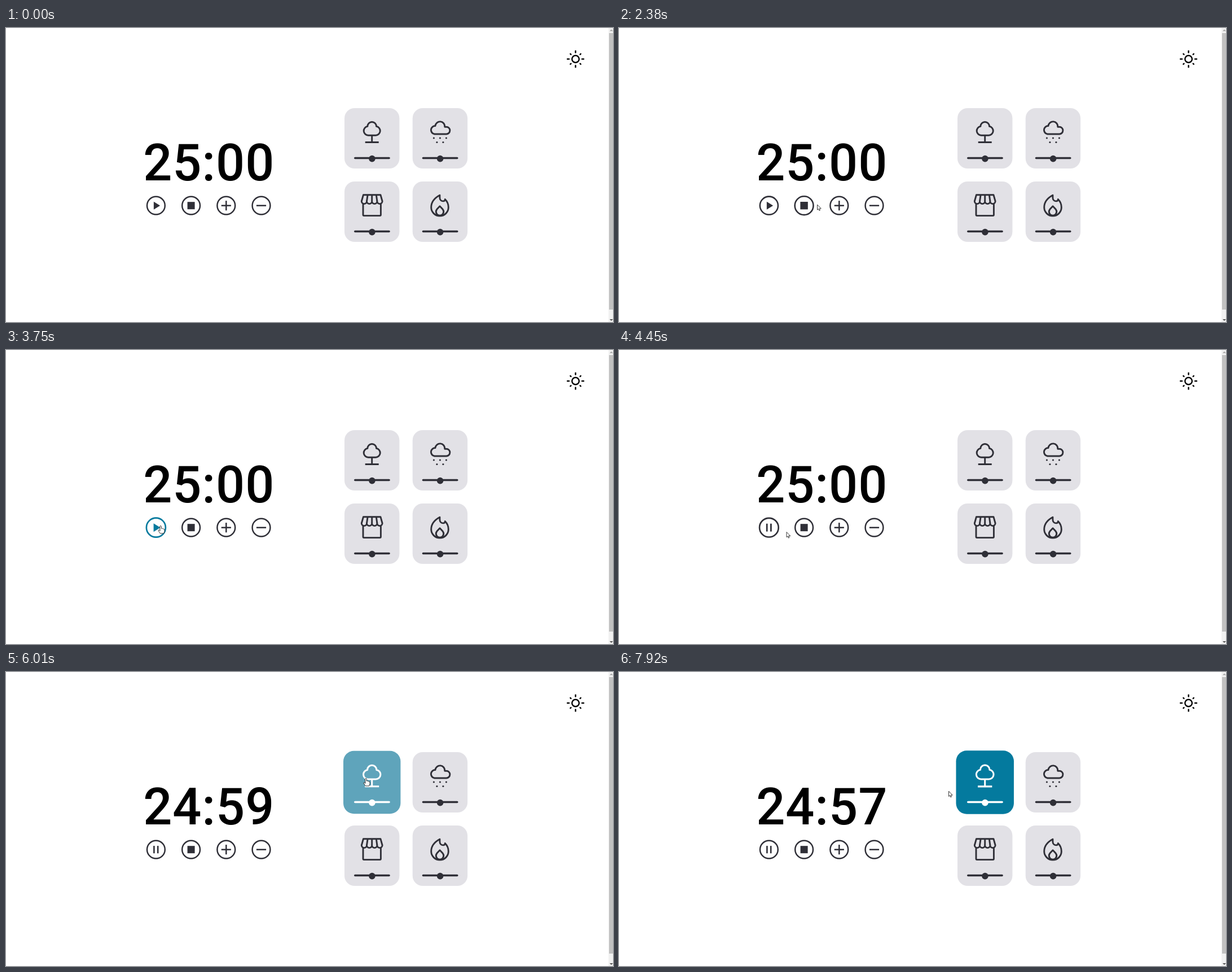
Animation of 1076x521 px, one loop 7.99 s. Source, as an HTML page with a canvas:

```html
<!DOCTYPE html>
<html lang="en">
<head>
<meta charset="utf-8">
<title>Focus timer</title>
<style>
  html, body { margin: 0; width: 100%; height: 100%; overflow: hidden; background: #fff; }
  canvas { display: block; }
</style>
</head>
<body>
<canvas id="stage" width="1076" height="521"></canvas>
<script>
const ctx = document.getElementById('stage').getContext('2d');
const LOOP = 7990, SHOW = 460, CLICK = 4110, FIRST_TICK = 5110, TICK = 1030;
const INK = '#2f2f37', BLUE = '#047a9e', GROW = 0.07;

// Where the pointer turns or rests: time, x, y
const PATH = [
  [SHOW, 925, 498], [1210, 481, 381], [1830, 266, 329], [2110, 269, 315],
  [2750, 477, 312], [2990, 434, 313], [3600, 274, 311], [4330, 274, 311],
  [4560, 316, 332.5], [5340, 316, 332.5], [5480, 326, 350], [5840, 600, 222],
  [6010, 638, 188], [6360, 638, 163.5], [6570, 638, 163.5], [6640, 645, 163.5],
  [7540, 645, 163.5], [LOOP, 580, 214.5]
];

const BUTTONS = [0, 1, 2, 3].map(i => ({ x: 265.9 + 62.2 * i, y: 314.7, hw: 19, hh: 17, dur: 300 }));
const CARDS = [0, 1, 2, 3].map(i => ({
  x: 648.7 + 120.7 * (i % 2), y: 195.5 + 130 * (i >> 1), hw: 49, hh: 54, dur: 500
}));

const TREE = new Path2D('M-6.3-5.3H6.3A8 8 0 0 0 7.8-21.2A7.8 7.8 0 0 0-7.8-21.2A8 8 0 0 0-6.3-5.3ZM0-5.3V7M-12 7H12');
const CLOUD = new Path2D('M-9.9-7.5H11.1A6.4 6.4 0 0 0 11.1-20.3H8.4A8.4 8.4 0 0 0-8.5-22A7.3 7.3 0 0 0-9.9-7.5Z');
const FIRE = new Path2D('M-.5-29.2V-25C-.5-21 2.4-18.6 5.6-18.6Q8.8-18.6 8.9-22C13-18 14.9-13 14.9-7.7A15.3 15.3 0 0 1-15.7-7.7C-15.7-16-10-24-.5-29.2ZM-.4-9.8L-5.6-4.2A6.8 6.8 0 0 0-.4 6.8A6.8 6.8 0 0 0 4.8-4.2Z');
const ARROW = new Path2D('M.4 .4V9.2L2.4 7.4L3.8 10.6L5.3 9.9L4 6.9H6.7Z');
const HAND = new Path2D('M-1.2 1.2Q0-.6 1.2 1.2V5.2Q2.6 4.4 3.4 5.6Q4.8 5 5.4 6.4Q7 6 7 8V10.5L5.6 14H-.8L-4 9.2Q-4 7.4-2.6 8L-1.2 9.2Z');

// Monotone cubic through the path points, so rests stay still
function slope(i, a) {
  if (i === 0 || i === PATH.length - 1) return 0;
  const rate = j => (PATH[j + 1][a] - PATH[j][a]) / (PATH[j + 1][0] - PATH[j][0]);
  const p = rate(i - 1), q = rate(i);
  return p * q <= 0 ? 0 : 2 * p * q / (p + q);
}
function pointer(t) {
  let i = 0;
  while (i < PATH.length - 2 && PATH[i + 1][0] <= t) i++;
  const p = PATH[i], q = PATH[i + 1], h = q[0] - p[0], u = (t - p[0]) / h, v = 1 - u;
  return [1, 2].map(a =>
    p[a] * v * v * (1 + 2 * u) + q[a] * u * u * (3 - 2 * u) +
    h * u * v * (slope(i, a) * v - slope(i + 1, a) * u));
}

// CSS "ease" timing curve
function ease(x) {
  if (x <= 0) return 0;
  if (x >= 1) return 1;
  let lo = 0, hi = 1, s = 0.5;
  for (let i = 0; i < 20; i++) {
    s = (lo + hi) / 2;
    if (0.75 * (1 - s) * s + s ** 3 < x) lo = s; else hi = s;
  }
  return 0.3 * (1 - s) ** 2 * s + 3 * (1 - s) * s * s + s ** 3;
}

const inside = (b, [x, y], w = b.hw, h = b.hh) => Math.abs(x - b.x) < w && Math.abs(y - b.y) < h;

// Times at which the pointer enters and leaves each target, in turn
for (const b of [...BUTTONS, ...CARDS]) {
  b.flips = [];
  for (let t = SHOW; t < LOOP; t += 5)
    if (inside(b, pointer(t)) !== (b.flips.length % 2 === 1)) b.flips.push(t);
}
const hovered = (b, t) => b.flips.filter(f => f <= t).length % 2 === 1;
function level(b, t) {
  let v = 0;
  b.flips.forEach((f, i) => {
    if (f > t) return;
    const end = Math.min(t, b.flips[i + 1] ?? t), goal = i % 2 ? 0 : 1;
    v += (goal - v) * ease((end - f) / b.dur);
  });
  return v;
}

function paint(color) { ctx.fillStyle = ctx.strokeStyle = color; }
function line(x1, y1, x2, y2) {
  ctx.beginPath();
  ctx.moveTo(x1, y1);
  ctx.lineTo(x2, y2);
  ctx.stroke();
}
function circle(x, y, r) {
  ctx.beginPath();
  ctx.arc(x, y, r, 0, 7);
}
function disc(x, y, r) {
  circle(x, y, r);
  ctx.fill();
}
// Triangle with a base of 2 * half, pointing along (dx, dy)
function triangle(x, y, half, dx, dy) {
  const len = Math.hypot(dx, dy), nx = -dy / len * half, ny = dx / len * half;
  ctx.beginPath();
  ctx.moveTo(x + nx, y + ny);
  ctx.lineTo(x - nx, y - ny);
  ctx.lineTo(x + dx, y + dy);
  ctx.fill();
}
function scaled(b, t, draw) {
  const s = 1 + GROW * level(b, t);
  ctx.save();
  ctx.translate(b.x, b.y);
  ctx.scale(s, s);
  draw();
  ctx.restore();
}

const minus = () => line(-8.6, 0, 8.6, 0);
const GLYPHS = [
  t => {
    if (t < CLICK) return triangle(-4, 0, 7, 11.2, 0);
    for (const x of [-3.5, 3.3]) ctx.fillRect(x - 1.3, -6.6, 2.6, 13.2);
  },
  () => ctx.fillRect(-6.5, -6.5, 13, 13),
  () => { minus(); line(0, -8.6, 0, 8.6); },
  minus
];

function drawButton(b, i, t) {
  scaled(b, t, () => {
    paint(hovered(b, t) ? BLUE : INK);
    ctx.lineWidth = 2.5;
    ctx.lineCap = 'butt';
    circle(0, 0, 15.9);
    ctx.stroke();
    GLYPHS[i](t);
  });
}

function drawShop() {
  const top = -29.7, eave = -18.5, r = 4.6, side = 15.7, floor = 7.1;
  ctx.beginPath();
  ctx.moveTo(15.3, top);
  ctx.lineTo(-15.3, top);
  for (let i = 0; i < 4; i++) ctx.arc((2 * i - 3) * r, eave, r, Math.PI, 0, true);
  ctx.closePath();
  ctx.moveTo(-side, eave + r);
  ctx.arcTo(-side, floor, side, floor, 1.6);
  ctx.arcTo(side, floor, side, eave, 1.6);
  ctx.lineTo(side, eave + r);
  ctx.stroke();
  for (const i of [-1, 0, 1]) line(7.6 * i, top, 2 * r * i, eave);
}

const ICONS = [
  () => ctx.stroke(TREE),
  () => {
    ctx.stroke(CLOUD);
    for (let i = -2; i <= 2; i++) disc(5.5 * i, i % 2 ? 7 : -0.5, 1.6);
  },
  drawShop,
  () => ctx.stroke(FIRE)
];

function drawCard(b, i, t) {
  const start = b.flips[0] ?? Infinity, on = t >= start;
  const k = on ? ease((t - start) / b.dur) : 0;
  const mix = (p, q) => Math.round(p + (q - p) * k);
  const ink = on ? '#fff' : INK;
  scaled(b, t, () => {
    ctx.fillStyle = `rgb(${mix(226, 4)},${mix(225, 122)},${mix(230, 158)})`;
    ctx.beginPath();
    ctx.roundRect(-48.7, -53.5, 97.4, 107, 18);
    ctx.fill();
    paint(ink);
    ctx.lineWidth = 2.9;
    ctx.lineCap = 'butt';
    ICONS[i]();
  });
  paint(ink);
  ctx.lineCap = 'round';
  ctx.lineWidth = 3.4;
  line(b.x - 30, b.y + 35, b.x + 30.4, b.y + 35);
  disc(b.x + 0.2, b.y + 36.1, 5.8);
}

function drawSun() {
  ctx.save();
  ctx.translate(1009.6, 55);
  paint('#000');
  ctx.lineCap = 'round';
  ctx.lineWidth = 2.4;
  circle(0, 0, 6.3);
  ctx.stroke();
  for (let i = 0; i < 8; i++) {
    line(11.5, 0, i % 2 ? 13 : 14.4, 0);
    ctx.rotate(Math.PI / 4);
  }
  ctx.restore();
}

function drawScrollbar() {
  ctx.fillStyle = '#f1f1f1';
  ctx.fillRect(1068, 0, 8, 521);
  ctx.fillStyle = '#c1c1c1';
  ctx.fillRect(1069, 9, 7, 490);
  ctx.fillStyle = '#a3a3a3';
  triangle(1073, 5.5, 3, 0, -3);
  ctx.fillStyle = '#505050';
  triangle(1073, 516, 3, 0, 3);
}

function drawPointer(t) {
  const p = pointer(t);
  const hand = BUTTONS.some(b => inside(b, p, 18, 19)) || CARDS.some(b => inside(b, p));
  const shape = hand ? HAND : ARROW;
  ctx.save();
  ctx.translate(...p);
  ctx.fillStyle = '#fff';
  ctx.strokeStyle = '#222';
  ctx.lineWidth = 0.9;
  ctx.fill(shape);
  ctx.stroke(shape);
  ctx.restore();
}

function drawTime(t) {
  const left = 1500 - Math.max(0, Math.floor((t - FIRST_TICK) / TICK) + 1);
  const text = Math.floor(left / 60) + ':' + String(left % 60).padStart(2, '0');
  ctx.fillStyle = '#000';
  ctx.font = '500 90px Roboto, sans-serif';
  ctx.letterSpacing = '0.9px';
  ctx.textAlign = 'center';
  ctx.fillText(text, 359.7, 270);
}

function frame(t) {
  ctx.fillStyle = '#fff';
  ctx.fillRect(0, 0, 1076, 521);
  ctx.lineJoin = 'round';
  drawTime(t);
  BUTTONS.forEach((b, i) => drawButton(b, i, t));
  CARDS.forEach((b, i) => drawCard(b, i, t));
  drawSun();
  drawScrollbar();
  if (t >= SHOW) drawPointer(t);
}

const begin = performance.now();
(function run() {
  frame((performance.now() - begin) % LOOP);
  requestAnimationFrame(run);
})();
</script>
</body>
</html>
```
